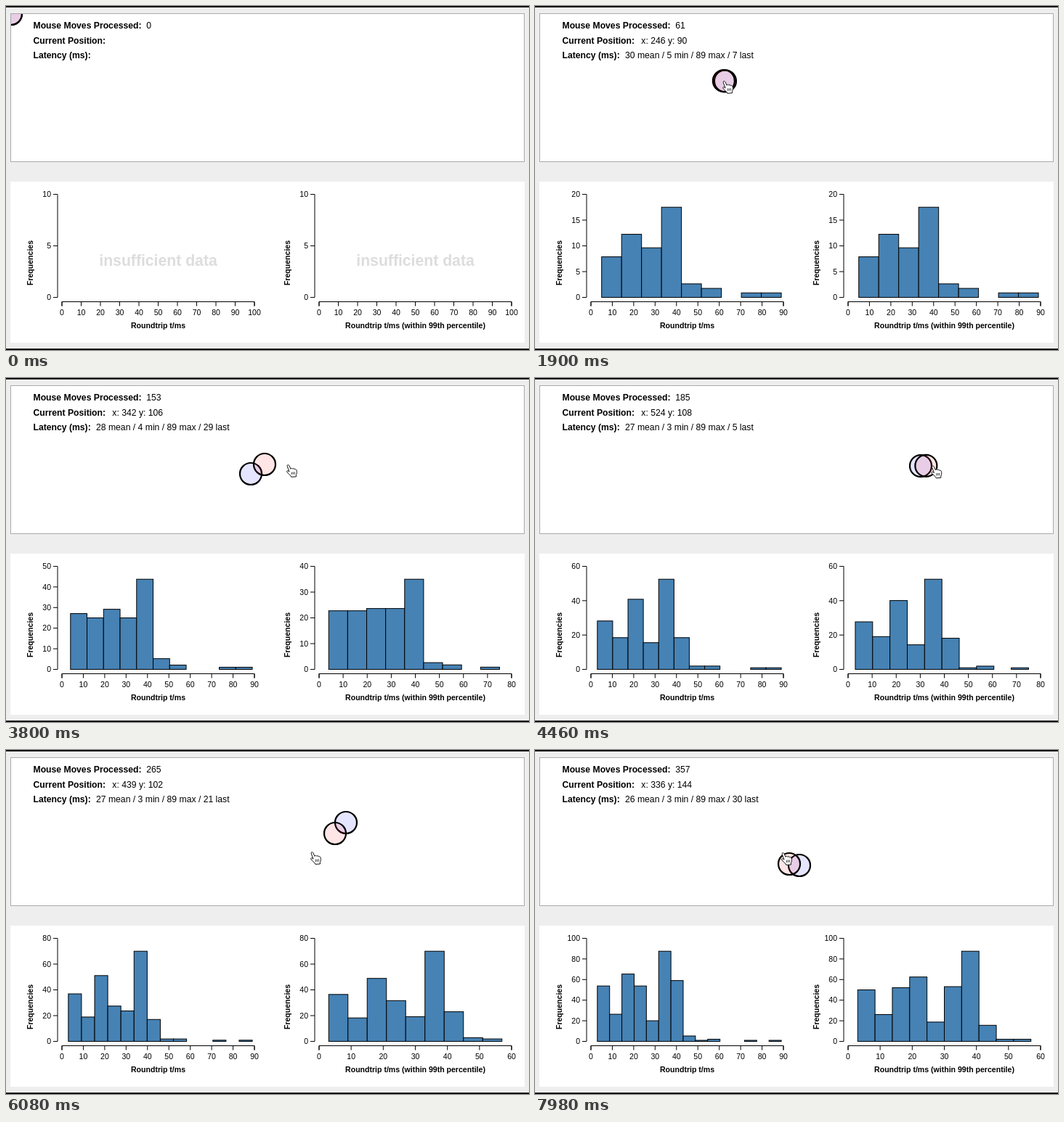
These frames come from a looping animation (720 px wide and 474 px high, 8 s). An HTML page with a canvas:

```html
<!DOCTYPE html>
<html lang="en">
<head>
<meta charset="utf-8">
<title>Latency histogram</title>
<style>
html, body { margin: 0; width: 100%; height: 100%; overflow: hidden; background: #eee; }
canvas { display: block; width: 720px; height: 474px; }
</style>
</head>
<body>
<canvas id="stage" width="720" height="474"></canvas>
<script>
const ctx = document.getElementById('stage').getContext('2d');
const LOOP = 8000, STEP = 20, LAG = 40, ENTER = 280;
const FACE = '"Liberation Sans", Arial, Helvetica, sans-serif';

// Key points: time, events so far, then blue disc, red disc and hand.
// The discs replay the pointer two lags and one lag behind the hand.
const keys = [
  [ENTER, -15, 150, -25, 150, -25, 150, -25],
  [1100, 24, 244, 117, 252, 117, 268, 114],
  [2720, 99, 357, 100, 407, 99.5, 429, 122],
  [3800, 153, 337, 132, 356, 119, 386, 119],
  [5120, 218, 597, 91.5, 597, 81.5, 566, 71],
  [6080, 265, 468, 100, 453, 115, 419, 140],
  [7980, 357, 364, 159, 350, 157, 339, 141]
];

// Each key gives three knots with a velocity in px/ms
const knots = keys.flatMap(([t, , bx, by, rx, ry, hx, hy]) => {
  const slope = (ax, ay, cx, cy, dt) => [(cx - ax) / dt, (cy - ay) / dt];
  return [
    { t: t - 2 * LAG, p: [bx, by], v: slope(bx, by, rx, ry, LAG) },
    { t: t - LAG, p: [rx, ry], v: slope(bx, by, hx, hy, 2 * LAG) },
    { t, p: [hx, hy], v: slope(rx, ry, hx, hy, LAG) }
  ];
});

const clamp01 = v => Math.min(1, Math.max(0, v));

function segment(list, t, timeOf) {
  let i = 0;
  while (i < list.length - 2 && timeOf(list[i + 1]) <= t) i++;
  const a = list[i], b = list[i + 1], span = timeOf(b) - timeOf(a);
  return { a, b, span, u: clamp01((t - timeOf(a)) / span) };
}

// Hermite curve; long stretches get softened tangents
function pointer(t) {
  const { a, b, span, u } = segment(knots, t, k => k.t);
  const s = Math.min(span, 500), w = 1 - u;
  return [0, 1].map(k =>
    a.p[k] * w * w * (1 + 2 * u) + b.p[k] * u * u * (3 - 2 * u) +
    s * u * w * (a.v[k] * w - b.v[k] * u));
}

function eventCount(t) {
  const { a, b, u } = segment(keys, t, k => k[0]);
  return Math.max(0, Math.floor(a[1] + (b[1] - a[1]) * u + 1e-6));
}

// Latency model: a slow warm-up, three steady modes and three outliers
const WARM_UP = 21;
const OUTLIERS = [89, 75, 57];
const bell = (x, mid, dev) => 1 / (1 + Math.exp(-1.702 * (x - mid) / dev));
const steady = x => 0.2 * bell(x, 6.8, 3) + 0.37 * bell(x, 19.7, 3.6) + 0.43 * bell(x, 36.6, 3.2);
const minLatency = n => Math.round(2.5 + 180 / n);
const meanLatency = n => Math.round(25.6 + 295 / n);

function body(n, x) {
  const typical = Math.max(0, n - OUTLIERS.length), warm = Math.min(typical, WARM_UP);
  return warm * bell(x, 33, 10) + (typical - warm) * steady(x);
}

function histogram(n, hi) {
  const lo = minLatency(n);
  const spread = hi < OUTLIERS[0] ? 38 : 39.4;
  const bins = Math.max(hi < OUTLIERS[0] ? 5 : 9, Math.floor((hi - lo) * Math.cbrt(n) / spread));
  const cum = i => {
    if (!i) return 0;
    const x = lo + (hi - lo) * i / bins;
    return Math.round(body(n, x)) + OUTLIERS.filter(v => v <= x + 1e-6).length;
  };
  return { lo, hi, counts: Array.from({ length: bins }, (_, i) => cum(i + 1) - cum(i)) };
}

function text(str, x, y, size, { bold = false, align = 'left', color = '#000' } = {}) {
  ctx.font = `${bold ? 'bold ' : ''}${size}px ${FACE}`;
  ctx.textAlign = align;
  ctx.fillStyle = color;
  ctx.fillText(str, x, y);
}

function line(...pts) {
  ctx.beginPath();
  for (let i = 0; i < pts.length; i += 2) ctx.lineTo(pts[i], pts[i + 1]);
  ctx.stroke();
}

function chart(x, label, hist) {
  const left = x + 71, origin = x + 77, width = 265, top = 259.5, base = 401.5, height = base - top;
  const axis = base + 6, small = 10.55, title = { bold: true, align: 'center' };
  const peak = hist ? Math.max(...hist.counts) : 10;
  const step = peak <= 20 ? 5 : peak <= 50 ? 10 : 20;
  const max = Math.max(10, Math.ceil(peak / step) * step);
  const from = hist ? Math.floor(hist.lo / 10) * 10 : 0;
  const to = hist ? Math.ceil(hist.hi / 10) * 10 : 100;
  const px = v => origin + (v - from) / (to - from) * width;

  ctx.lineWidth = 1;
  ctx.strokeStyle = '#000';
  if (hist) {
    const { lo, hi, counts } = hist;
    const w = (px(hi) - px(lo)) / counts.length;
    counts.forEach((c, i) => {
      if (!c) return;
      const bar = [px(lo) + i * w, base, w, -c / peak * 0.875 * height];
      ctx.fillStyle = '#4682b4';
      ctx.fillRect(...bar);
      ctx.strokeRect(...bar);
    });
  } else {
    text('insufficient data', x + 209.5, 357.5, 21.2, { ...title, color: '#ddd' });
  }

  line(left - 6, top, left, top, left, base, left - 6, base);
  for (let v = 0; v <= max; v += step) {
    const y = base - v / max * height;
    line(left - 6, y, left, y);
    text(v, x + 62, y + 3.7, small, { align: 'right' });
  }
  line(px(from), axis + 6, px(from), axis, px(to), axis, px(to), axis + 6);
  for (let v = from; v <= to; v += 10) {
    line(px(v), axis, px(v), axis + 6);
    text(v, px(v), 425.5, small, { align: 'center' });
  }
  text(label, x + 209.5, 444, small, title);
  ctx.save();
  ctx.translate(x + 37, 354);
  ctx.rotate(-Math.PI / 2);
  text('Frequencies', 0, 0, small, title);
  ctx.restore();
}

function disc([x, y], fill) {
  ctx.beginPath();
  ctx.arc(x, y, 15, 0, Math.PI * 2);
  ctx.fillStyle = fill;
  ctx.fill();
  ctx.lineWidth = 2.2;
  ctx.strokeStyle = '#000';
  ctx.stroke();
}

const hand = new Path2D('M1.2 2.6C.6.4 3 0 3.8 1.6L6 6.4C6.6 5 8.2 5 8.8 6.4C9.6 5.4 11.2 5.6 11.6 7' +
  'C12.8 6.2 14 7.2 14.2 8.8C14.6 11 14.4 13 13.4 14.6L13.4 17L6.8 17.4L6.2 16' +
  'C4.4 14.4 3 12.4 1 10.8C-.2 9.4 1.4 8 3 9.4L4 10.2Z');
const knuckles = new Path2D('M7.4 10.6V14M9.4 10.5V13.9M11.4 10.4V13.8');

function drawHand([x, y]) {
  ctx.save();
  ctx.translate(x, y);
  ctx.fillStyle = '#fff';
  ctx.strokeStyle = '#111';
  ctx.lineJoin = 'round';
  ctx.lineWidth = 1;
  ctx.fill(hand);
  ctx.stroke(hand);
  ctx.lineWidth = 0.8;
  ctx.stroke(knuckles);
  ctx.restore();
}

function drawPanels() {
  ctx.fillStyle = '#eee';
  ctx.fillRect(0, 0, 720, 474);
  ctx.fillStyle = '#111';
  ctx.fillRect(0, 0, 720, 2);
  ctx.fillRect(0, 472, 720, 2);
  ctx.fillStyle = '#fff';
  ctx.fillRect(6, 10, 708, 205);
  ctx.fillRect(6, 242, 708, 222);
  ctx.strokeStyle = '#aaa';
  ctx.lineWidth = 1;
  ctx.strokeRect(6.5, 10.5, 707, 204);
}

function drawReadout(n, red) {
  const size = 12.2, rows = [31.3, 51.8, 72.1];
  ['Mouse Moves Processed:', 'Current Position:', 'Latency (ms):'].forEach((s, i) =>
    text(s, 37.5, rows[i], size, { bold: true }));
  text(n, 193.2, rows[0], size);
  if (!n) return;
  const lo = minLatency(n), noise = Math.abs(Math.sin(n * 12.9898) * 43758.5) % 1;
  const [x, y] = [red[0] - 14, red[1] - 13].map(v => Math.max(0, Math.round(v)));
  text(`x: ${x} y: ${y}`, 146.3, rows[1], size);
  text(`${meanLatency(n)} mean / ${lo} min / ${OUTLIERS[0]} max / ${Math.floor(lo + noise * 38)} last`,
    124, rows[2], size);
}

function draw(t) {
  const n = eventCount(t);
  const [blue, red] = n ? [pointer(t - 2 * LAG), pointer(t - LAG)] : [[7, 11], [7, 11]];
  drawPanels();
  drawReadout(n, red);

  ctx.save();
  ctx.beginPath();
  ctx.rect(7, 11, 706, 203);
  ctx.clip();
  disc(blue, 'rgba(0,0,255,.1)');
  disc(red, 'rgba(255,0,0,.1)');
  ctx.restore();

  const ready = n >= 4;
  const cut = OUTLIERS[Math.min(2, Math.floor(n / 100))];
  chart(0, 'Roundtrip t/ms', ready && histogram(n, OUTLIERS[0]));
  chart(354, 'Roundtrip t/ms (within 99th percentile)', ready && histogram(n, cut));
  if (t >= ENTER) drawHand(pointer(t));
}

const start = performance.now();
function tick() {
  const t = (performance.now() - start) % LOOP;
  draw(Math.floor(t / STEP) * STEP);
  requestAnimationFrame(tick);
}
tick();
</script>
</body>
</html>
```
